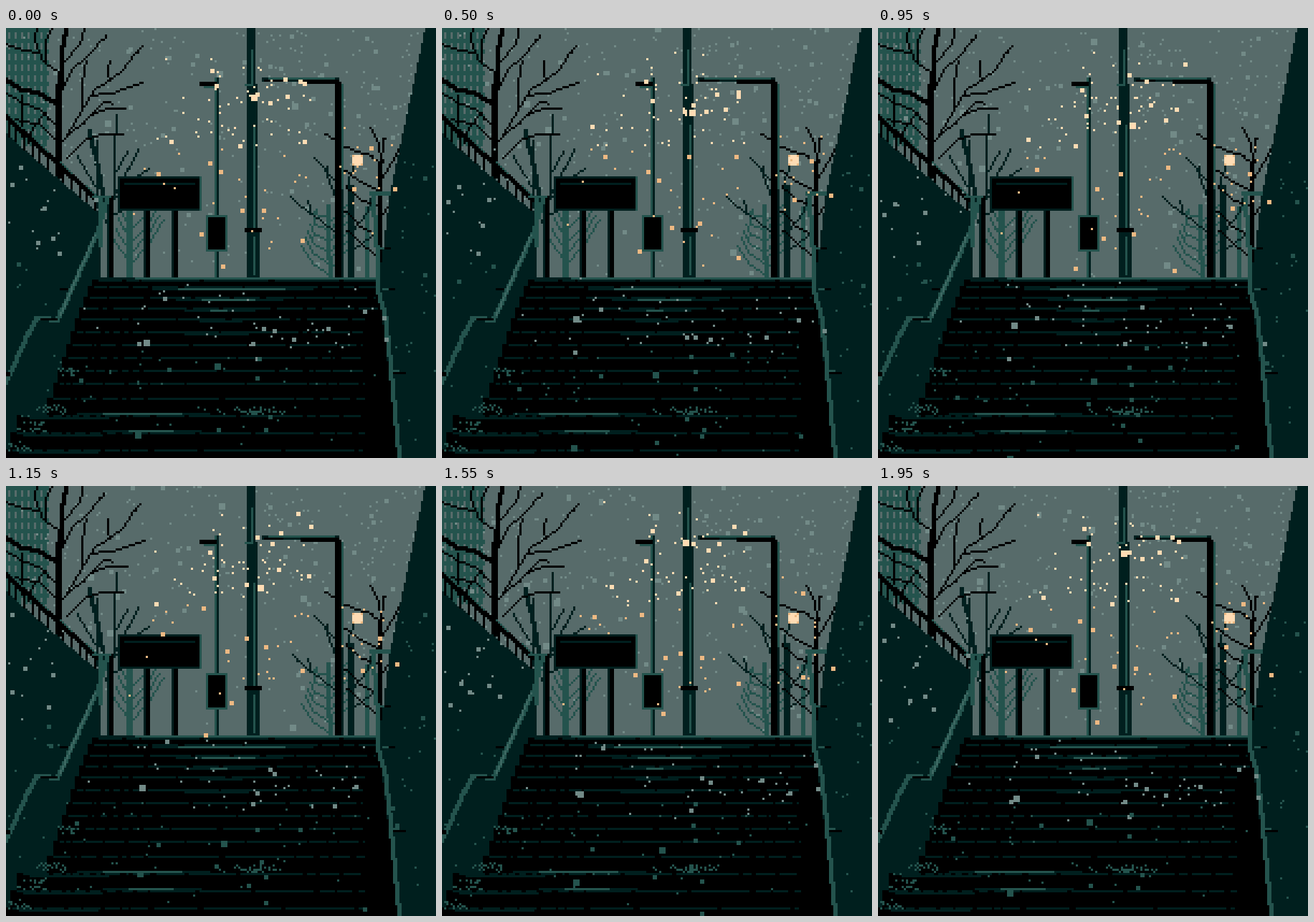
These frames come from a looping animation (600x600 px, 2 s). An HTML page with a canvas:

```html
<!DOCTYPE html>
<html>
<head>
<meta charset="utf-8">
<style>
html, body { margin: 0; width: 100%; height: 100%; overflow: hidden; background: #000; }
canvas { display: block; width: 100vw; height: 100vh; image-rendering: pixelated; }
</style>
</head>
<body>
<canvas id="stage" width="200" height="200"></canvas>
<script>
const ctx = document.getElementById('stage').getContext('2d');
const SKY = '#576b6a', DARK = '#001f1e', TEAL = '#24534d', BLACK = '#000';
const SNOW = '#728a87', CREAM = '#ffdcb4', AMBER = '#edb983';
const CELL = 3; // scene units per canvas pixel
let seed;

function rnd() {
  seed = (seed * 1664525 + 1013904223) >>> 0;
  return seed / 4294967296;
}
const between = (a, b) => a + rnd() * (b - a);
const cell = v => Math.round(v / CELL);

function rect(color, x, y, w, h) {
  ctx.fillStyle = color;
  ctx.fillRect(cell(x), cell(y), Math.max(1, cell(w)), Math.max(1, cell(h)));
}

// Hard-edged polyline
function line(color, width, ...p) {
  for (let i = 0; i + 3 < p.length; i += 2) {
    const dx = p[i + 2] - p[i], dy = p[i + 3] - p[i + 1];
    const n = Math.max(1, Math.ceil(Math.max(Math.abs(dx), Math.abs(dy)) / CELL));
    for (let k = 0; k <= n; k++)
      rect(color, p[i] + dx * k / n - width / 2, p[i + 1] + dy * k / n - width / 2, width, width);
  }
}

// Hard-edged polygon, filled row by row
function poly(color, ...p) {
  for (let y = 1.5; y < 600; y += CELL) {
    const hits = [];
    for (let i = 0; i < p.length; i += 2) {
      const j = (i + 2) % p.length;
      if (p[i + 1] > y !== p[j + 1] > y)
        hits.push(p[i] + (y - p[i + 1]) * (p[j] - p[i]) / (p[j + 1] - p[i + 1]));
    }
    hits.sort((a, b) => a - b);
    for (let i = 0; i + 1 < hits.length; i += 2)
      rect(color, hits[i], y - 1.5, hits[i + 1] - hits[i], CELL);
  }
}

function flakes(n, t, fall, place, tint) {
  for (let i = 0; i < n; i++) {
    const [x, y] = place(), life = (t + rnd()) % 1, big = rnd();
    const drop = fall * between(.6, 1.4), drift = between(-25, 25);
    const size = big < .78 ? 3 : big < .98 ? 6 : 9;
    const px = x + drift * life, py = y + drop * (life - .5);
    rect(tint(px, py), px, py, size, size);
  }
}

function speckle(n, color, x, y, w, h) {
  for (let i = 0; i < n; i++) rect(color, x + rnd() * w, y + rnd() * h, 4, 3);
}

function building() {
  rect(TEAL, 0, 0, 60, 165);
  for (let y = 5; y < 165; y += 15)
    for (let x = 2; x < 58; x += 9) rect(SKY, x, y, 3, 9);
}

function leftTrees(a, b) {
  line(TEAL, 10, 173, 348, 173, 255);
  for (let i = 0; i < 4; i++) {
    line(TEAL, 3, 172, 325 - i * 16, 150 + i * 3, 295 - i * 15);
    line(TEAL, 3, 174, 332 - i * 16, 200, 300 - i * 15, 219 - i * 6, 268 - i * 6);
  }
  line(DARK, 4, 150, 250, 152, 180, 155, 123);
  line(DARK, 5, 138, 250, 128, 195, 116, 143);
  line(DARK, 4, 128, 250, 128, 157);
  line(DARK, 3, 128, 225, 99, 178);
  line(DARK, 3, 150, 235, 172, 195, 185, 168);
  line(DARK, 3, 152, 238, 180, 208, 198, 197);
  line(DARK, 3, 151, 205, 170, 172);
  line(DARK, 3, 138, 270, 170, 250);

  line(BLACK, 10, 73, 207, 74, 130, 76, 65);
  line(BLACK, 5, 76, 65, 77, 35, 84, 0);
  line(BLACK, 4, 73, 62, 52, 48, 40, 15, 46, 0);
  line(BLACK, 3, 45, 35, 22, 30, 0, 23);
  line(BLACK, 3, 55, 48, 55, 20, 64, 2);
  line(BLACK, 4, 78, 88, 95, 55, 117, 38, 141 + a, 10);
  line(BLACK, 3, 79, 48, 104, 22, 110 + a, 0);
  line(BLACK, 4, 81, 157, 108, 112, 125, 86, 162, 62, 190 + a, 25);
  line(BLACK, 3, 145, 72, 141, 62, 146 + a, 45);
  line(BLACK, 3, 118, 94, 152, 90, 191 + b, 76);
  line(BLACK, 3, 106, 108, 106, 78, 112, 47);
  line(BLACK, 4, 84, 155, 120, 122, 143, 112, 166 + b, 112);
  line(BLACK, 3, 108, 132, 136, 102, 148, 105);
  line(BLACK, 3, 86, 182, 112, 155, 135, 147, 164, 147);
  line(BLACK, 5, 70, 106, 45, 90, 20, 85, 0, 72);
  line(BLACK, 4, 70, 138, 50, 115, 23, 105, 0, 90);
  line(BLACK, 3, 22, 150, 22, 95);
  line(BLACK, 3, 55, 118, 36, 142, 30, 160);
  line(BLACK, 3, 69, 158, 48, 135, 12, 128);
}

function rightTrees(b) {
  line(TEAL, 6, 452, 348, 450, 250);
  for (let i = 0; i < 6; i++) {
    line(TEAL, 3, 450, 345 - i * 16, 430, 330 - i * 14, 413 + i * 4, 303 - i * 10);
    line(TEAL, 3, 451, 340 - i * 14, 480, 305 - i * 13);
  }
  line(TEAL, 5, 504, 348, 505, 250);
  line(DARK, 10, 482, 348, 482, 225);
  line(DARK, 3, 482, 245, 478, 212, 486, 190);
  line(DARK, 4, 460, 286, 425, 258, 397 + b, 237);
  line(DARK, 3, 425, 258, 422, 242);
  line(DARK, 4, 462, 217, 445, 197, 432, 183);
  line(DARK, 3, 462, 240, 450, 212, 448, 193);
  line(DARK, 3, 484, 282, 505, 255, 512, 228);
  line(DARK, 3, 484, 310, 516, 285);
  line(BLACK, 7, 523, 335, 522, 240, 524, 187);
  line(BLACK, 4, 524, 190, 508, 178, 490, 173, 470, 165);
  line(BLACK, 3, 470, 170, 458, 155, 446, 148);
  line(BLACK, 3, 524, 190, 520, 160, 509, 140);
  line(BLACK, 3, 524, 182, 528, 153);
  line(BLACK, 3, 526, 207, 542, 180, 548, 168);
  line(BLACK, 4, 522, 228, 500, 218, 470, 197);
  line(BLACK, 3, 521, 250, 496, 240, 474, 220);
  line(BLACK, 4, 521, 290, 495, 278, 468, 250);
  line(BLACK, 3, 520, 320, 495, 300, 476, 282);
  line(BLACK, 3, 524, 262, 540, 242);
  rect(AMBER, 483, 177, 15, 15);
  rect(CREAM, 486, 177, 9, 15);
  rect(CREAM, 483, 180, 15, 9);
}

function post(x, top) {
  rect(DARK, x, top, 9, 348 - top);
  rect(BLACK, x + 3, top, 5, 348 - top);
}

function street() {
  rect(TEAL, 291, 69, 6, 279);
  rect(DARK, 294, 69, 3, 279);
  rect(BLACK, 270, 75, 24, 6);
  rect(TEAL, 276, 81, 15, 3);
  rect(TEAL, 278, 261, 31, 51);
  rect(BLACK, 281, 264, 24, 45);

  rect(DARK, 336, 0, 12, 80);
  rect(TEAL, 341, 30, 3, 47);
  rect(DARK, 336, 78, 15, 203);
  rect(TEAL, 333, 78, 12, 3);
  rect(TEAL, 346, 135, 3, 145);
  rect(DARK, 336, 284, 18, 64);
  rect(TEAL, 345, 291, 4, 54);
  rect(BLACK, 333, 279, 24, 6);

  [141, 192, 231].forEach((x, i) => post(x, i ? 254 : 235));
  rect(TEAL, 157, 207, 116, 48);
  rect(DARK, 157, 207, 113, 48);
  rect(BLACK, 160, 211, 110, 42);
  rect(DARK, 165, 216, 99, 3);

  rect(DARK, 357, 69, 108, 6);
  rect(TEAL, 366, 69, 94, 3);
  rect(BLACK, 360, 73, 27, 3);
  rect(BLACK, 411, 72, 55, 5);
  rect(BLACK, 460, 75, 9, 273);
  rect(TEAL, 467, 78, 3, 150);
  rect(DARK, 467, 225, 3, 123);
}

function leftWall() {
  for (let x = 4; x < 126; x += 11) line(BLACK, 4, x, 122 + x * .92, x, 156 + x * .84);
  line(TEAL, 3, 0, 117, 125, 233);
  line(BLACK, 5, 0, 123, 125, 238);
  poly(DARK, 0, 148, 125, 255, 133, 255, 133, 350, 133, 600, 0, 600);
}

const TOPS = [350, 361, 376, 391, 406, 424, 442, 460, 478, 496, 517, 540, 565, 589, 603];
const LEFTS = [120, 114, 108, 102, 96, 90, 84, 78, 72, 66, 57, 15, 6, 0];

function stairs() {
  LEFTS.forEach((x, i) => {
    const y = TOPS[i];
    rect(BLACK, x, y, 550 - x, TOPS[i + 1] - y + 3);
    const end = i < 4 ? 517 : 500;
    for (let s = x + 8; s < end;) {
      const middle = s > 190 && s < 400;
      const len = middle ? between(30, 110) : between(3, i < 5 ? 60 : 28);
      rect(DARK, s, y, Math.min(len, end - s), 3);
      s += len + between(3, 9);
    }
    if (i > 10) rect(DARK, x + 18, y + 3, 110, 3);
  });
  rect(TEAL, 121, 348, 396, 3);
  rect(DARK, 121, 348, 60, 3);
  [[240, 364, 150], [273, 379, 75], [285, 394, 24], [135, 538, 110], [170, 562, 62]]
    .forEach(([x, y, w]) => {
      rect(DARK, x - 35, y - 1, w + 75, 3);
      rect(TEAL, x, y, w, 3);
    });
  rect(DARK, 270, 409, 60, 3);
  rect(DARK, 250, 427, 90, 3);
  speckle(32, TEAL, 295, 528, 90, 11);
  speckle(16, TEAL, 70, 474, 36, 9);
  speckle(20, TEAL, 40, 525, 42, 13);
  speckle(20, TEAL, 14, 548, 42, 14);
  speckle(18, TEAL, 0, 576, 42, 13);
}

function rails() {
  rect(TEAL, 121, 234, 26, 4);
  rect(TEAL, 128, 234, 5, 72);
  line(TEAL, 6, 142, 238, 128, 285, 72, 408, 42, 404, 0, 495);
  line('#3d6862', 3, 124, 290, 76, 400);
  rect(BLACK, 48, 406, 24, 4);
  rect(BLACK, 74, 364, 12, 4);
  rect(BLACK, 0, 480, 6, 5);

  poly(DARK, 585, 0, 600, 0, 600, 600, 548, 600, 525, 400, 519, 350, 525, 318, 536, 230);
  rect(TEAL, 508, 229, 29, 5);
  line(TEAL, 6, 512, 234, 517, 290, 520, 370, 530, 404, 537, 475, 549, 600);
  [[520, 307], [525, 364], [540, 479]].forEach(([x, y]) => {
    rect(BLACK, x, y, 17, 4);
    rect(TEAL, x, y - 2, 10, 3);
  });
}

function snowfall(t) {
  const warm = (x, y) => y < 165 ? CREAM : AMBER;
  const cool = limit => (x, y) => y < limit ? SNOW : TEAL;
  flakes(56, t, 65, () => [330 + (rnd() + rnd() - 1) * 115, between(55, 150)], warm);
  flakes(30, t, 75, () => [between(170, 430), between(150, 320)], warm);
  flakes(16, t, 60, () => [between(455, 540), between(145, 265)], () => AMBER);
  flakes(24, t, 80, () => [between(0, 125), between(170, 345)], cool(325));
  flakes(12, t, 60, () => [between(0, 90), between(350, 560)], () => TEAL);
  flakes(34, t, 50, () => [between(170, 500), between(365, 450)], cool(465));
  flakes(60, t, 60, () => [between(95, 530), between(400, 590)], cool(440));
  flakes(24, t, 60, () => [between(548, 600), between(130, 590)], () => TEAL);
}

function draw(t) {
  seed = 71;
  const upper = t > .1 && t < .65 ? -3 : 0;
  const lower = t > .5 && t < .92 ? 3 : 0;
  rect(SKY, 0, 0, 600, 600);
  building();
  flakes(210, t, 70, () => [between(0, 590), between(-15, 350)], () => SNOW);
  flakes(110, t, 60, () => [between(60, 590), between(-15, 150)], () => SNOW);
  leftTrees(upper, lower);
  rightTrees(lower);
  street();
  leftWall();
  stairs();
  rails();
  snowfall(t);
}

let shown = -1;
function tick() {
  const step = Math.floor(performance.now() % 2000 / 50);
  if (step !== shown) draw((shown = step) / 40);
  requestAnimationFrame(tick);
}
tick();
</script>
</body>
</html>
```
